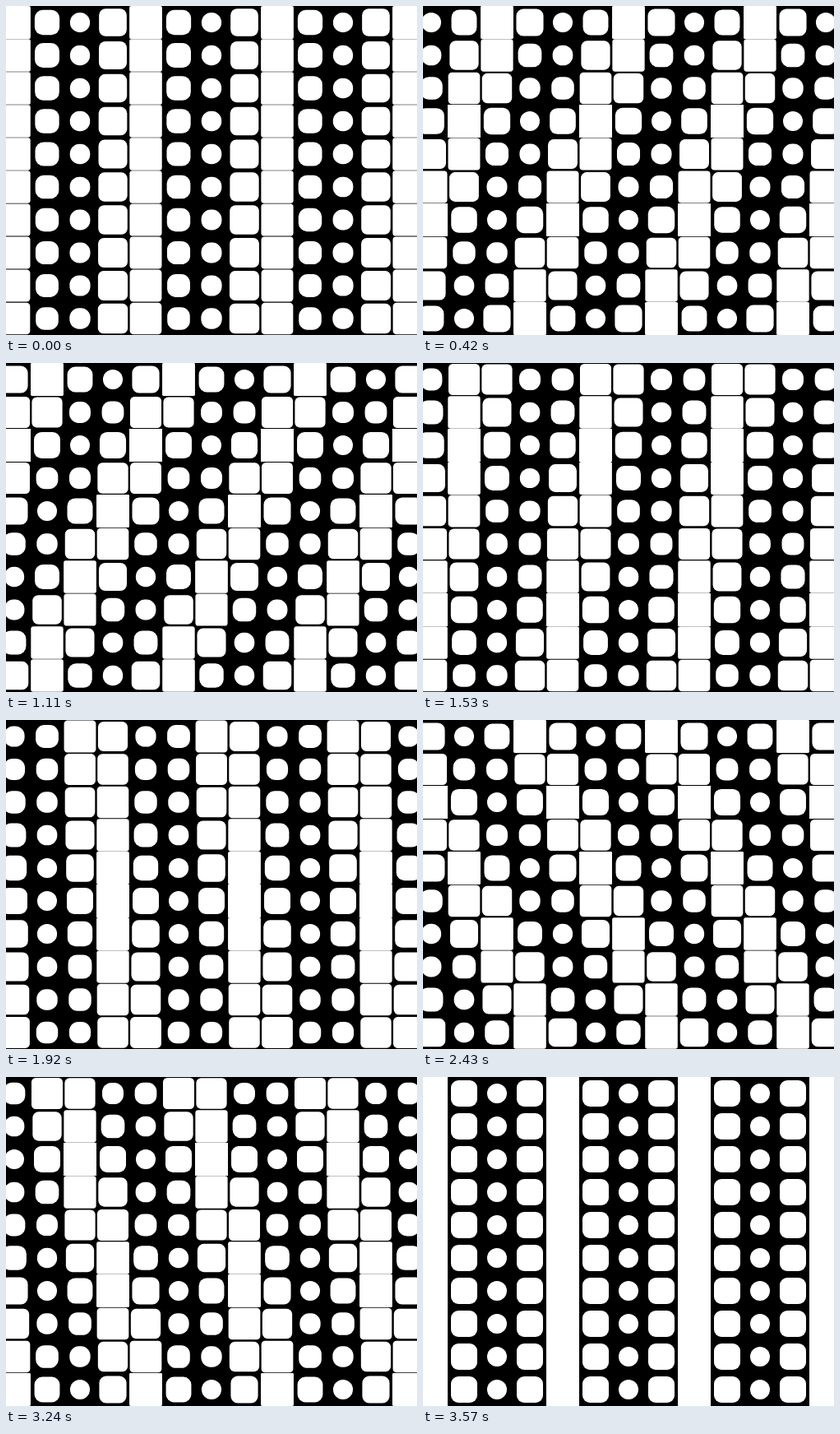
An HTML page with a canvas for the animation above (3.6 s loop, 500x400 px).

```html
<!DOCTYPE html>
<html lang="en">
<head>
<meta charset="utf-8">
<title>Rounded grid wave</title>
<style>
  html, body { margin: 0; width: 100%; height: 100%; overflow: hidden; background: #000; }
  canvas { display: block; }
</style>
</head>
<body>
<canvas id="stage" width="500" height="400"></canvas>
<script>
const ctx = document.getElementById('stage').getContext('2d');
const TAU = Math.PI * 2;
const CELL = 40, COLS = 13, ROWS = 10;
const STEP = 30, STEPS = 120;

// Blends from a full square (phase 0) to a small circle (phase PI).
function tile(x, y, phase) {
  const c = Math.cos(phase);
  const size = 32 + 8 * c;
  const radius = 12 * Math.pow(Math.max(0, (1 - c) / 2), 0.4);
  ctx.roundRect(x - size / 2, y - size / 2, size, size, Math.min(radius, size / 2));
}

function draw(ms) {
  const step = Math.floor(ms / STEP) % STEPS + 1;
  const angle = TAU * step / STEPS;
  const shear = Math.PI / 4 * Math.sin(angle);

  ctx.fillStyle = '#000';
  ctx.fillRect(0, 0, 500, 400);
  ctx.fillStyle = '#fff';
  for (let row = 0; row < ROWS; row++) {
    for (let col = 0; col < COLS; col++) {
      ctx.beginPath();
      tile(10 + col * CELL, 20 + row * CELL, col * Math.PI / 2 + angle + (row + 4) * shear);
      ctx.fill();
    }
  }
}

const start = performance.now();
function loop() {
  draw(performance.now() - start);
  requestAnimationFrame(loop);
}
loop();
</script>
</body>
</html>
```
